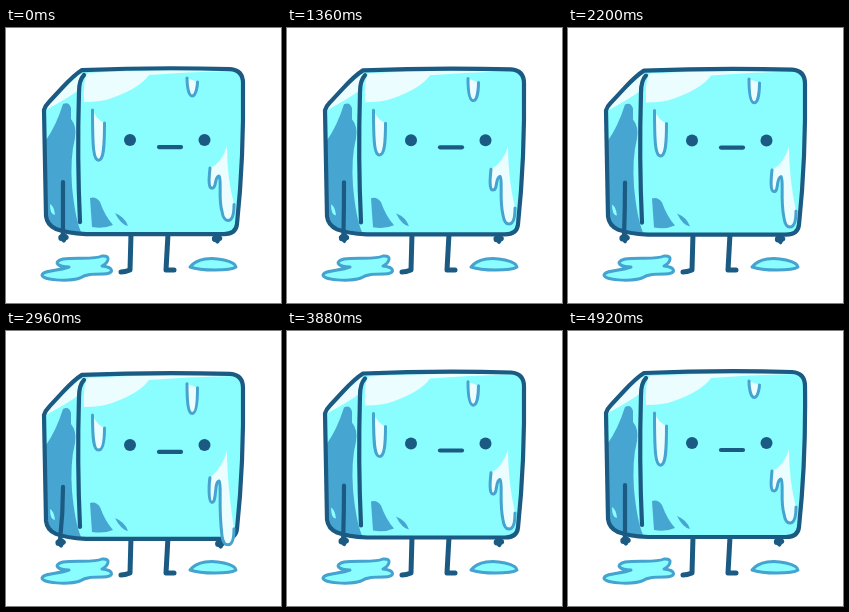
These frames come from a looping animation (275 px wide and 275 px high, 4.96 s). An HTML page:

```html
<!DOCTYPE html>
<html lang="en">
<head>
<meta charset="utf-8">
<title>Melting ice cube</title>
<style>
  html, body { margin: 0; width: 100%; height: 100%; overflow: hidden; background: #fff; }
  svg { display: block; width: 100vw; height: 100vh; }
  path { stroke-linecap: round; stroke-linejoin: round; }
  .ink { fill: none; stroke: #1b5a82; stroke-width: 4.2; }
  .blob { fill: #1b5a82; }
  .rim { fill: none; stroke: #45a3cf; stroke-width: 3; }
  .shade { fill: #47a6d1; }
  .shine { fill: #ecfdff; }
  .ice { fill: #8afdff; }
  .pool { fill: #8afdff; stroke: #45a3cf; stroke-width: 3; }
</style>
</head>
<body>
<svg viewBox="0 0 275 275">
  <path class="pool" d="M63 239C52 239 46 234 57 231C70 229 88 232 96 228C106 227 102 235 96 238C108 239 109 246 97 246C87 246 80 246 74 250C62 254 36 252 36 247C37 242 53 243 63 239Z"/>
  <path class="pool" d="M184 239C191 230 206 229 218 232Q230 235 230 239C224 243 195 243 184 239Z"/>
  <path class="ink" d="M125 206L124 242Q119 244 115 244M162 206L160 242H168" style="stroke-width:5"/>

  <g id="body">
    <path class="ice" d="M78 41L70 46L39 78L40 188Q41 198 50 201Q60 206 80 206H218Q230 206 231 196Q237 140 237 55Q237 42 224 41Z"/>
    <path class="shine" d="M74 46L78 47Q73 52 73 62Q62 70 40 82Q42 76 56 62Z"/>
    <path class="shade" d="M57 76Q63 73 65 80L65 91Q71 98 69 110Q64 130 66 158Q69 190 75 204Q58 204 50 200Q41 196 41 188L40 112Q50 98 57 76Z"/>
    <path class="ice" d="M44 176Q48 178 49 187Q44 187 44 176Z"/>
    <path class="shine" d="M82 45Q150 41 225 43Q180 44 143 47Q134 60 106 70Q96 74 78 74Q77 49 82 45Z"/>
    <path class="shade" d="M84 170Q90 168 94 174Q99 188 107 197Q98 201 86 199ZM109 185Q119 189 122 198Q115 197 109 185Z"/>

    <path class="shine" id="leftFill"/>
    <path class="shine" id="topFill"/>
    <path class="ink" d="M76 42Q150 39 224 41Q237 42 237 55Q238 130 231 196Q230 206 218 206H80Q60 205 50 201Q41 197 40 188L38 82Q39 78 43 74L56 60Q68 47 76 42Z"/>
    <path class="ink" d="M78 47Q73 52 73 64Q71 130 74 194"/>
    <path class="ink" id="arm"/>
    <path class="blob" id="hands"/>
    <path class="shine" id="rightFill"/>
    <path class="rim" id="rims"/>

    <circle class="blob" cx="124" cy="112" r="6"/>
    <circle class="blob" cx="198.500" cy="112" r="6"/>
    <path class="ink" d="M153 119H175"/>
  </g>
</svg>
<script>
const PERIOD = 1240;
const byId = id => document.getElementById(id);
const setPath = (id, d) => byId(id).setAttribute('d', d);

// Half sine arch over one period: a quick start, a slow peak
const arch = phase => Math.abs(Math.sin(Math.PI * phase));

// A hanging U from (x0, y0) round the bottom and up to (x1, y1)
const drop = (x0, y0, x1, y1, bottom) =>
  `M${x0} ${y0}C${x0} ${bottom - 12} ${x0 + 1} ${bottom} ${(x0 + x1) / 2} ${bottom}` +
  `C${x1 - 1} ${bottom} ${x1} ${bottom - 12} ${x1} ${y1}`;

const hand = (x, y) =>
  `M${x - 5} ${y - 1}Q${x} ${y - 7} ${x + 5} ${y - 1}Q${x + 6} ${y + 2} ${x + 3} ${y + 3}` +
  `Q${x + 1} ${y + 8} ${x - 2} ${y + 4}Q${x - 6} ${y + 4} ${x - 5} ${y - 1}Z`;

function draw(now) {
  const phase = now / PERIOD;
  const sag = arch(phase + 0.04) ** 2;
  byId('body').setAttribute('transform', `translate(0 ${2 * sag})`);

  const leftEnd = 136.5 - 19.5 * arch(phase + 0.07);
  const topEnd = 66 + 15 * arch(phase + 0.04);
  const topStart = 50 + sag;
  const rightEnd = 192 + 21 * sag;
  const shortEnd = 160 + 10 * sag;
  const rightStart = 140 + 5 * sag;

  const left = drop(86.5, 82, 98.5, 95, leftEnd);
  const top = drop(181, topStart, 191.5, topStart + 4, topEnd);
  const small = `M204 ${rightStart}C203 150 202 ${shortEnd} 206 ${shortEnd}` +
                `C211 ${shortEnd} 208 149 213 148`;
  const big = `C216 151 212 170 216 ${rightEnd - 9}C217 ${rightEnd - 2} 219 ${rightEnd} 222 ${rightEnd}` +
              `C227 ${rightEnd} 228 ${rightEnd - 9} 228 ${rightEnd - 16}`;

  setPath('leftFill', left + 'Q91 92 86.5 82Z');
  setPath('topFill', top + `L181 ${topStart}Z`);
  setPath('rightFill', small + big + `Q221 150 221 118Q216 135 204 ${rightStart}Z`);
  setPath('rims', left + top + small + big);
  setPath('arm', `M57 154Q57 180 ${57 - 3 * sag} 206`);
  setPath('hands', hand(57.5 - 3 * sag, 209) + hand(211 + 3.5 * sag, 210));
  requestAnimationFrame(draw);
}
requestAnimationFrame(draw);
</script>
</body>
</html>
```
